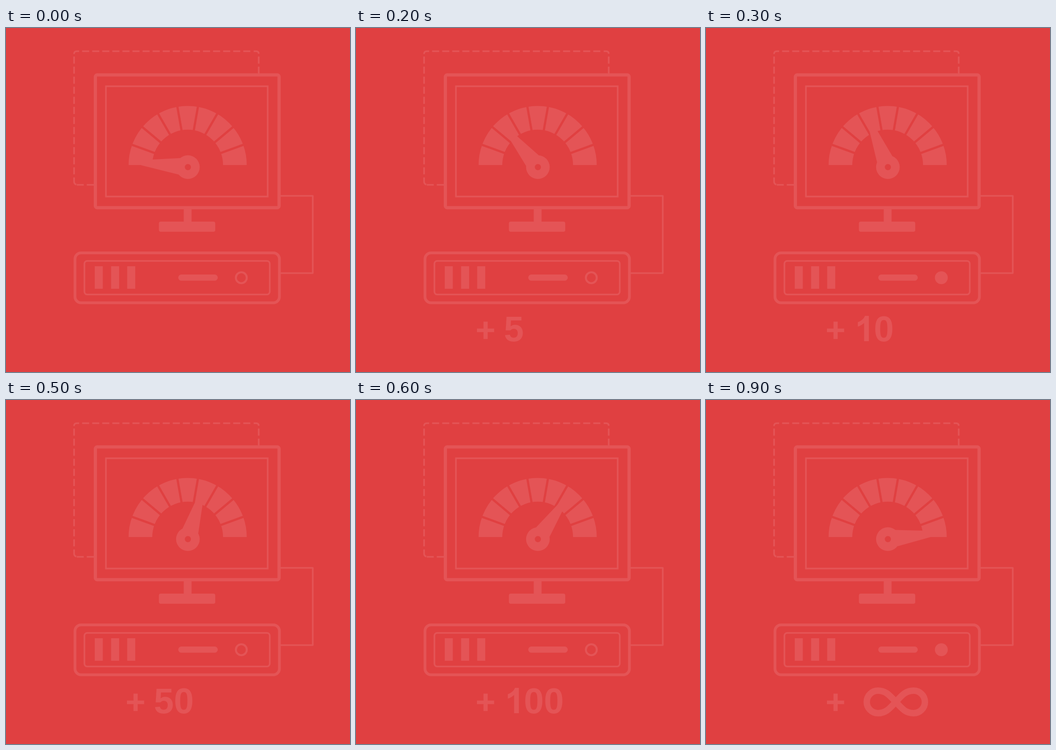
These frames come from a looping animation (748 px wide and 748 px high, 1300 ms). An HTML page:

```html
<!DOCTYPE html>
<html lang="en">
<head>
<meta charset="utf-8">
<title>Speed gauge</title>
<style>
  html, body { margin: 0; width: 100%; height: 100%; overflow: hidden; background: #e04041; }
  svg { display: block; width: 100%; height: 100%; }
  .line { fill: none; stroke: #e45456; stroke-width: 3.6; stroke-linecap: round; stroke-linejoin: round; }
  .ink { fill: #e45456; }
  .gap { fill: none; stroke: #e04041; stroke-width: 4.8; }
  .hole { fill: #e04041; }
  .dash { stroke-linecap: butt; stroke-dasharray: 15.4 6.5; }
  text { font: bold 78px "Liberation Sans", Arial, sans-serif; }
</style>
</head>
<body>
<svg viewBox="0 0 748 748">
  <!-- dashed window -->
  <path class="line dash" d="M165.500 50.500H532"/>
  <path class="line dash" d="M148 62V321"/>
  <path class="line dash" d="M191 341H154"/>
  <path class="line dash" d="M549.500 62V99"/>
  <path class="line" style="stroke-linecap:butt" d="M148 56.500Q148 50.500 154 50.500H159M538.500 50.500H544Q549.500 50.500 549.500 56M148 325V334Q148 339 153 340.500"/>

  <!-- monitor -->
  <rect class="line" x="194.300" y="102" width="399.500" height="288.700" rx="4" style="stroke-width:7"/>
  <rect class="line" x="217.300" y="126.700" width="351.700" height="239.800" style="stroke-linejoin:miter"/>
  <rect class="ink" x="386.500" y="392" width="17" height="32"/>
  <rect class="ink" x="332.500" y="421" width="122.500" height="22" rx="4"/>

  <!-- cable -->
  <path class="line" d="M597 365H667V533H597"/>

  <!-- gauge -->
  <path class="line" d="M292.300 298A102.700 102.700 0 0 1 497.700 298" style="stroke-width:51.500;stroke-linecap:butt"/>
  <g id="gaps" class="gap"></g>
  <g transform="translate(395.500 302.500)">
    <path id="needle" class="ink" d="M-8 -19.500L-101 -5.600Q-106 -4.500 -106 0T-101 5.600L-8 19.500Z"/>
    <circle class="ink" r="25.700"/>
    <circle class="hole" r="6.700"/>
  </g>

  <!-- server -->
  <rect class="line" x="150" y="489" width="444.500" height="108.500" rx="13" style="stroke-width:6"/>
  <rect class="line" x="170.500" y="506.500" width="403" height="73" rx="6"/>
  <path class="ink" d="M193 518h17.500v49h-17.500zM228.500 518h17.500v49h-17.500zM263.500 518h17.500v49h-17.500z"/>
  <rect class="ink" x="374.500" y="536" width="86" height="13.500" rx="6.700"/>
  <circle class="ink" cx="511.700" cy="543" r="14"/>
  <circle id="led" class="hole" cx="511.700" cy="543" r="9.700"/>

  <!-- counter -->
  <g id="count" class="ink">
    <path d="M277.300 638.500h9v15h14v7.800h-14v15h-9v-15h-14.300v-7.800h14.300z"/>
    <path id="one" transform="translate(324 681) scale(.0374 -.0374)" d="M807 0H526V1059Q372 915 163 846V1101Q273 1137 402 1237T579 1472H807Z"/>
    <text id="digits" y="681"></text>
    <path id="inf" class="line" style="stroke-width:14" d="M412.700 656.500C399 642 391 632 374 632A24.500 24.500 0 0 0 374 681C391 681 399 671 412.700 656.500C426 642 434 632 451.500 632A24.500 24.500 0 0 1 451.500 681C434 681 426 671 412.700 656.500Z"/>
  </g>
</svg>
<script>
const LOOP = 1300;
const steps = [
  { at: 0, angle: 5.5, value: "" },
  { at: 100, angle: 33, value: "1" },
  { at: 200, angle: 50, value: "5", x: 321.5 },
  { at: 300, angle: 68, value: "10", x: 365, lit: true },
  { at: 400, angle: 85, value: "20", x: 321.5 },
  { at: 500, angle: 107, value: "50", x: 321.5 },
  { at: 600, angle: 125, value: "100", x: 365 },
  { at: 700, angle: 146, value: "500", x: 323 },
  { at: 900, angle: 173, value: "∞", lit: true }
];
const el = id => document.getElementById(id);
const show = (id, on) => el(id).setAttribute("visibility", on ? "inherit" : "hidden");

for (let a = 20; a < 180; a += 20) {
  const gap = document.createElementNS("http://www.w3.org/2000/svg", "path");
  gap.setAttribute("d", "M-74 0H-131");
  gap.setAttribute("transform", `translate(395 298) rotate(${a})`);
  el("gaps").append(gap);
}

function draw(ms) {
  const t = ms % LOOP;
  const { angle, value, x = 0, lit } = steps.filter(s => s.at <= t).pop();
  const one = value.startsWith("1"), inf = value === "∞";
  el("needle").setAttribute("transform", `rotate(${angle})`);
  show("led", !lit);
  show("count", value !== "");
  show("one", one);
  show("inf", inf);
  el("digits").setAttribute("x", x);
  el("digits").textContent = inf ? "" : one ? value.slice(1) : value;
  el("count").setAttribute("aria-label", "+ " + value);
}

let start;
function tick(now) {
  start ??= now;
  draw(Math.max(0, now - start));
  requestAnimationFrame(tick);
}
draw(0);
requestAnimationFrame(tick);
</script>
</body>
</html>
```
